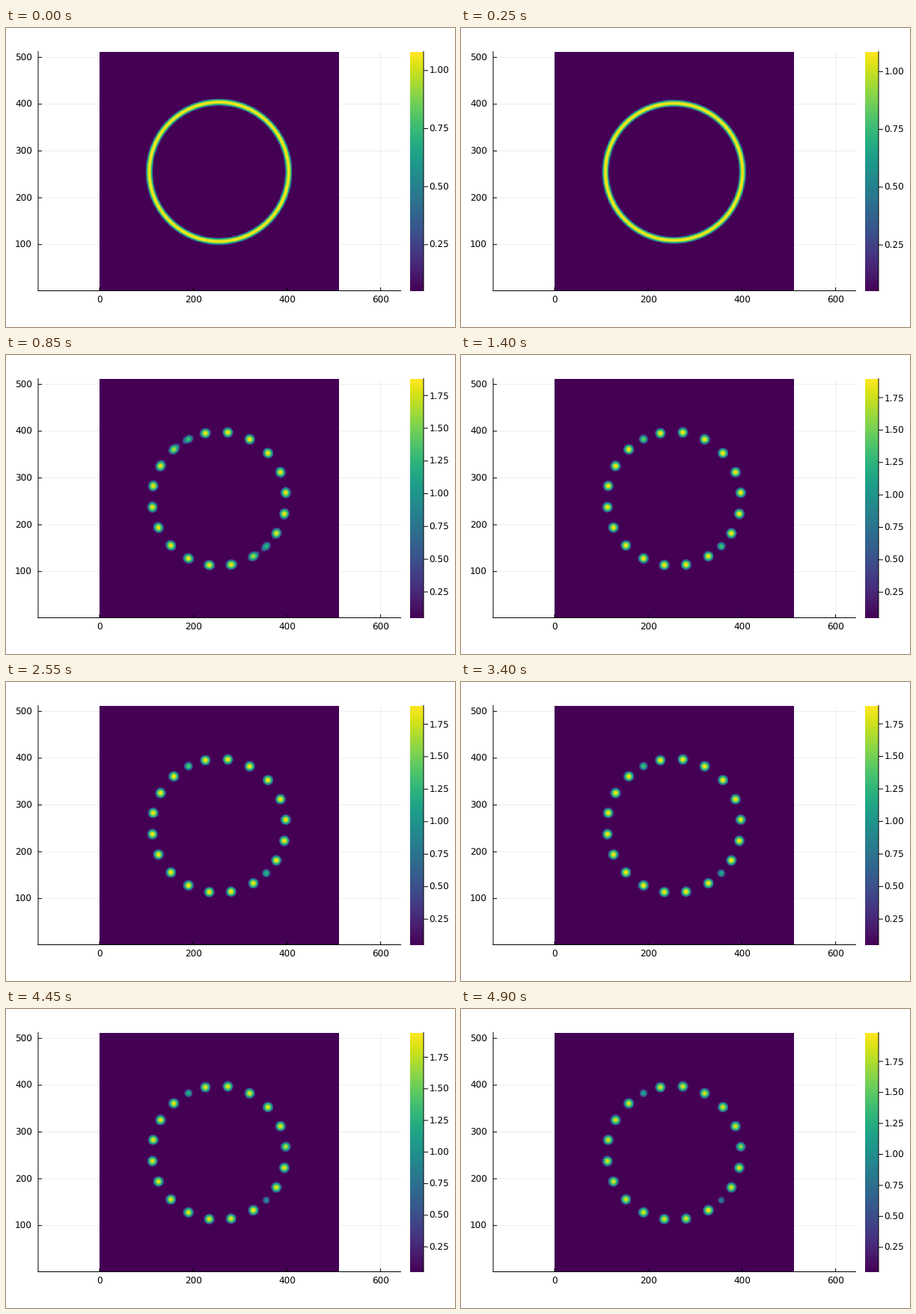
Write a matplotlib script that moves like this. It is 600 px wide and 400 px high and loops after 4950 ms.

```python
import numpy as np
import matplotlib.pyplot as plt
from matplotlib.animation import FuncAnimation

W, H, DPI = 600, 400, 100
FRAMES, STEP = 99, 50
PT = 72 / DPI                     # points per pixel
SCALE = 0.626                     # pixels per data unit
LEFT, RIGHT, TOP, BOTTOM = 43, 528, 32, 352
N, FILM, RING, FULL = 512, 0.05, 1.08, 1.895   # grid size and film heights
DROPS, RADIUS = 20, 143.2

# Droplets run clockwise from the break near the top, in degrees;
# the spacing is tighter around the two small ones
idx = np.arange(DROPS)
POS = np.interp(idx, [0, 3, 6, 8, 9, 13, 17, 19],
                [0, 59, 113.5, 141.5, 162, 237, 310, 340.7])
GAP = np.diff(np.append(POS, 360))

# The break spreads both ways and reaches the small droplets last
from_break = np.minimum(np.abs(idx - 0.5) - 0.5, DROPS - idx)
late_spots = sum(np.exp(-((idx - c) / 0.9) ** 2) for c in (7.4, 17.6))
DELAY = np.minimum(35 * from_break, 70) + 190 * late_spots
GAP_DELAY = (DELAY + np.roll(DELAY, -1)) / 2 + 45
GAP_DELAY[0] = 0


def px(v):
    return 125 + SCALE * v


def py(v):
    return 352 - SCALE * (v - 0.5)


def grow(t):
    return 1 / (1 + np.exp((594 - t) / 68))


# Polar geometry of the cells close to the ring
yy, xx = np.mgrid[1:N + 1, 1:N + 1] - 256.0
dist = np.hypot(xx, yy)
band = np.abs(dist - 146) < 22
dist = dist[band]
ang = (82.4 - np.degrees(np.arctan2(yy[band], xx[band]))) % 360
gap = np.searchsorted(POS, ang, side="right") - 1
u = (ang - POS[gap]) / GAP[gap]
near = np.where(u < 0.5, gap, (gap + 1) % DROPS)
arc = np.radians(np.minimum(u, 1 - u) * GAP[gap]) * RADIUS
wave = (1 + np.cos(2 * np.pi * u)) / 2


def heights(t):
    late = max(t - 1100, 0) / 3800
    final = np.full(DROPS, FULL - 0.012 * late)
    # Small droplets drain into a neighbour
    final[7] = 1.38 - 0.45 * late ** 1.5
    final[18] = 1.50 - 0.32 * late ** 1.5
    final[8] = 1.86 + 0.12 * late ** 3
    final[4] -= 0.2 * late ** 3
    return RING + (final - RING) * grow(t - DELAY)


def film(t, peak):
    cap = peak - FILM
    g = grow(t - DELAY)
    size = 12 * (peak / 1.87) ** 0.6
    curve = 0.0161 * (1 - g) + cap / size ** 2 * g

    # Crest along the ring: a wavy ridge that turns into round caps
    opened = grow(t - GAP_DELAY)[gap]
    neck = (RING - FILM) * np.maximum(1 - 1.35 * opened, 0)
    ridge = neck + (cap[near] - neck) * wave
    drop = cap[near] * (1 - (arc / size[near]) ** 2)
    mix = opened ** 3
    crest = ridge * (1 - mix) + drop * mix

    ring = RADIUS + 5.8 * max(1 - t / 900, 0) ** 1.6
    bend = np.interp(ang, POS, curve, period=360)
    h = crest - bend * (dist - ring) ** 2
    field = np.full((N, N), FILM)
    field[band] += (h + np.sqrt(h * h + 0.06 ** 2)) / 2
    return field


plt.rcParams["text.hinting"] = "none"
fig = plt.figure(figsize=(W / DPI, H / DPI), dpi=DPI, facecolor="white")
ax = fig.add_axes([0, 0, 1, 1])
ax.axis("off")


def line(x, y, **kw):
    style = dict(color="black", lw=PT, solid_capstyle="butt", snap=False, zorder=3)
    return ax.plot(x, y, **{**style, **kw})[0]


def label(x, y, s, ha):
    return ax.text(x, y + 4.4, s, ha=ha, va="baseline", color="black",
                   fontsize=12 * PT, family="DejaVu Sans")


def show(data, x0, x1):
    return ax.imshow(data, cmap="viridis", origin="lower", aspect="auto",
                     interpolation="nearest", zorder=1, extent=(x0, x1, BOTTOM, TOP))


for v in range(0, 601, 200):
    x = px(v)
    line([x, x], [TOP, BOTTOM], alpha=0.07, zorder=0)
    line([x, x], [BOTTOM, BOTTOM - 5])
    label(x, 363, str(v), "center")
for v in range(100, 501, 100):
    y = py(v)
    line([LEFT, RIGHT], [y, y], alpha=0.07, zorder=0)
    line([LEFT, LEFT + 5], [y, y])
    label(35, y, str(v), "right")
line([LEFT, LEFT], [TOP - 1, BOTTOM])
line([LEFT - 0.5, RIGHT], [BOTTOM - 0.5, BOTTOM - 0.5])

heat = show(np.full((N, N), FILM), 125, 445)
show(np.arange(256)[:, None], 540, 558)
line([558, 558], [TOP - 1, BOTTOM])

bar = []
for v in np.arange(0.25, 2, 0.25):
    bar.append((v, line([558, 564], [0, 0]), label(565.5, 0, f"{v:.2f}", "left")))

ax.set_xlim(0, W)
ax.set_ylim(H, 0)


def update(n):
    t = n * STEP
    peak = heights(t)
    top = peak.max()
    heat.set_data(film(t, peak))
    heat.set_clim(FILM, top)
    for v, tick, text in bar:
        y = BOTTOM - (BOTTOM - TOP) * (v - FILM) / (top - FILM)
        tick.set_ydata([y, y])
        text.set_y(y + 4.4)
        tick.set_visible(v <= top)
        text.set_visible(v <= top)
    return [heat]


anim = FuncAnimation(fig, update, frames=FRAMES, interval=STEP, repeat=True)
plt.show()
```
